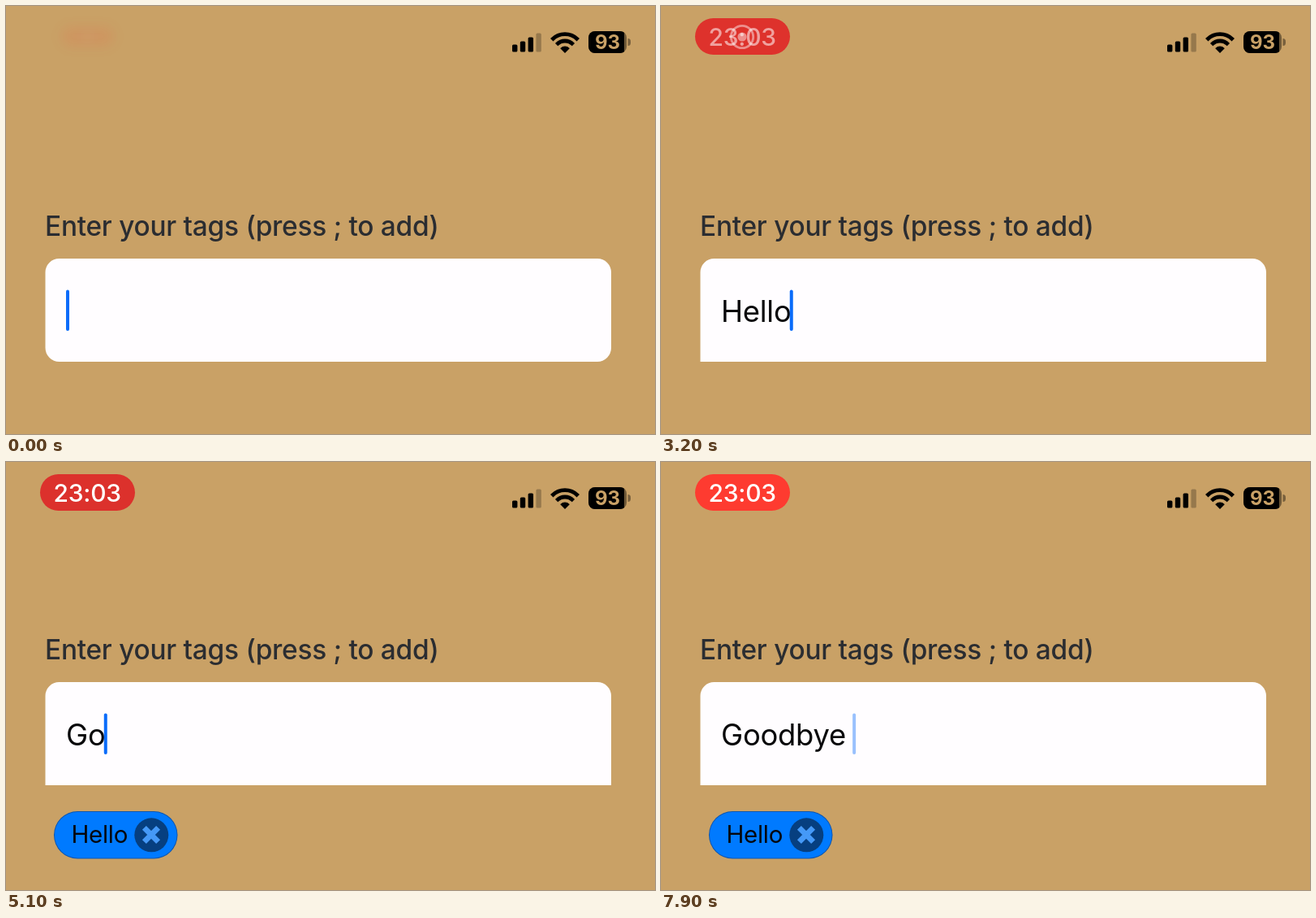
Recreate the animation shown at these times as an HTML page with a canvas. Size 800 px wide and 527 px high, loop 8000 ms.

```html
<!DOCTYPE html>
<html lang="en">
<head>
<meta charset="utf-8">
<title>Tag input</title>
<style>
html, body { margin: 0; width: 100%; height: 100%; overflow: hidden; background: #c9a166; }
canvas { display: block; width: 800px; height: 527px; }
</style>
</head>
<body>
<canvas id="stage" width="800" height="527"></canvas>
<script>
const ctx = document.getElementById('stage').getContext('2d');
const LOOP = 8000;
const BG = '#c9a166';
const BLUE = '#007aff';
const CARET = '#0a6cfa';
const FONT = 'Inter, "Liberation Sans", sans-serif';
const ADD_AT = 3500;

// [time, field content]
const keys = [
  [0, ''], [900, 'H'], [1150, 'He'], [1400, 'Hel'], [1750, 'Hell'], [2200, 'Hello'],
  [ADD_AT, ''], [4700, 'G'], [5050, 'Go'], [5350, 'Goo'], [5700, 'Good'],
  [6100, 'Goodb'], [6450, 'Goodby'], [6800, 'Goodbye'], [7350, 'Goodbye ']
];

const ramp = (t, a, b) => Math.min(1, Math.max(0, (t - a) / (b - a)));
const mix = (a, b, k) => a + (b - a) * k;

function box(x, y, w, h, r, fill) {
  ctx.beginPath();
  ctx.roundRect(x, y, w, h, r);
  ctx.fillStyle = fill;
  ctx.fill();
}

function disc(x, y, r, fill) {
  ctx.beginPath();
  ctx.arc(x, y, r, 0, Math.PI * 2);
  ctx.fillStyle = fill;
  ctx.fill();
}

function setFont(size, weight, spacing) {
  ctx.font = `${weight} ${size}px ${FONT}`;
  ctx.letterSpacing = spacing + 'px';
}

function write(str, x, y, fill) {
  ctx.fillStyle = fill;
  ctx.fillText(str, x, y);
}

function statusBar() {
  [9, 13, 18, 23].forEach((h, i) =>
    box(624 + i * 9.8, 56.5 - h, 6.4, h, 1.6, i < 3 ? '#000' : 'rgba(0,0,0,.25)'));

  // wifi
  ctx.save();
  ctx.beginPath();
  ctx.moveTo(689, 58);
  ctx.lineTo(664, 33);
  ctx.lineTo(664, 28);
  ctx.lineTo(714, 28);
  ctx.lineTo(714, 33);
  ctx.closePath();
  ctx.clip();
  ctx.strokeStyle = '#000';
  ctx.lineWidth = 4.8;
  for (const r of [14, 22.3]) {
    ctx.beginPath();
    ctx.arc(689, 57, r, Math.PI, 0);
    ctx.stroke();
  }
  disc(689, 57, 7.6, '#000');
  ctx.restore();

  // battery
  box(718, 31, 47, 27, 8, 'rgba(0,0,0,.45)');
  ctx.save();
  ctx.beginPath();
  ctx.rect(718, 31, 44, 27);
  ctx.clip();
  box(718, 31, 47, 27, 8, '#000');
  ctx.restore();
  box(766.5, 40, 3.5, 9, [0, 4, 4, 0], 'rgba(0,0,0,.4)');
  setFont(24, 700, 0);
  ctx.textAlign = 'center';
  write('93', 741.5, 53.3, BG);
  ctx.textAlign = 'left';
}

function recordPill(t) {
  const show = mix(0.1, 1, ramp(t, 0, 500));
  const dim = (1 - Math.cos(t / 1000 * Math.PI)) / 2;
  const grow = mix(0.55, 1, ramp(t, 0, 400));
  const blur = 7 * (1 - ramp(t, 0, 400));
  const swap = ramp(t, 2900, 3450);

  ctx.save();
  ctx.globalAlpha = show;
  if (blur > 0) ctx.filter = `blur(${blur}px)`;
  ctx.translate(100.5, 37.5);
  ctx.scale(grow, grow);
  const rgb = [mix(255, 219, dim), mix(59, 49, dim), mix(48, 44, dim)].map(Math.round);
  box(-58.5, -22.5, 117, 45, 22.5, `rgb(${rgb})`);

  if (swap < 1) {
    ctx.globalAlpha = show * (1 - swap);
    ctx.strokeStyle = '#fff';
    ctx.lineWidth = 2.8;
    ctx.beginPath();
    ctx.arc(-0.5, 0.5, 13.7, 0, Math.PI * 2);
    ctx.stroke();
    disc(-0.5, 0.5, mix(6.2, 5, swap), '#fff');
  }
  if (swap > 0) {
    ctx.globalAlpha = swap;
    setFont(30, 500, -0.2);
    ctx.textAlign = 'center';
    write('23:03', -0.3, 11, '#fff');
  }
  ctx.restore();
}

function tag() {
  box(59, 430, 152.5, 58.5, 29.2, '#0a56b0');
  box(60, 431, 150.5, 56.5, 28.2, BLUE);
  setFont(29.5, 400, -0.3);
  write('Hello', 80.5, 469.3, '#05070c');
  disc(179.3, 459.3, 21, '#063f80');
  ctx.strokeStyle = '#4599f7';
  ctx.lineWidth = 7;
  ctx.beginPath();
  for (const s of [-1, 1]) {
    ctx.moveTo(179 - 8.6, 459 - 8.6 * s);
    ctx.lineTo(179 + 8.6, 459 + 8.6 * s);
  }
  ctx.stroke();
}

function caretAlpha(idle) {
  const p = idle % 1000;
  return p < 700 ? 1 - ramp(p, 480, 600) : ramp(p, 900, 1000);
}

function field(t) {
  const [since, str] = keys.filter(k => k[0] <= t).pop();
  const top = t < ADD_AT ? 311 : 271;
  const foot = str.length > 1 ? 0 : 17;

  setFont(33.4, 500, -0.25);
  write('Enter your tags (press ; to add)', 48, top - 28.5, '#2b2d31');
  box(48.5, top, 697.5, 127, [17, 17, foot, foot], '#fffdff');

  setFont(36.4, 400, -0.25);
  write(str, 74, top + 77.5, '#08080a');
  const x = Math.max(76, 74.3 + ctx.measureText(str).width);
  ctx.globalAlpha = caretAlpha(t - since);
  box(x - 2, top + 38.5, 4, 50.5, 2, CARET);
  ctx.globalAlpha = 1;
}

function draw(now) {
  const t = now % LOOP;
  ctx.fillStyle = BG;
  ctx.fillRect(0, 0, 800, 527);
  statusBar();
  recordPill(t);
  field(t);
  if (t >= ADD_AT) tag();
}

let start;
function tick(now) {
  start ??= now;
  draw(now - start);
  requestAnimationFrame(tick);
}
draw(0);
requestAnimationFrame(tick);
</script>
</body>
</html>
```
